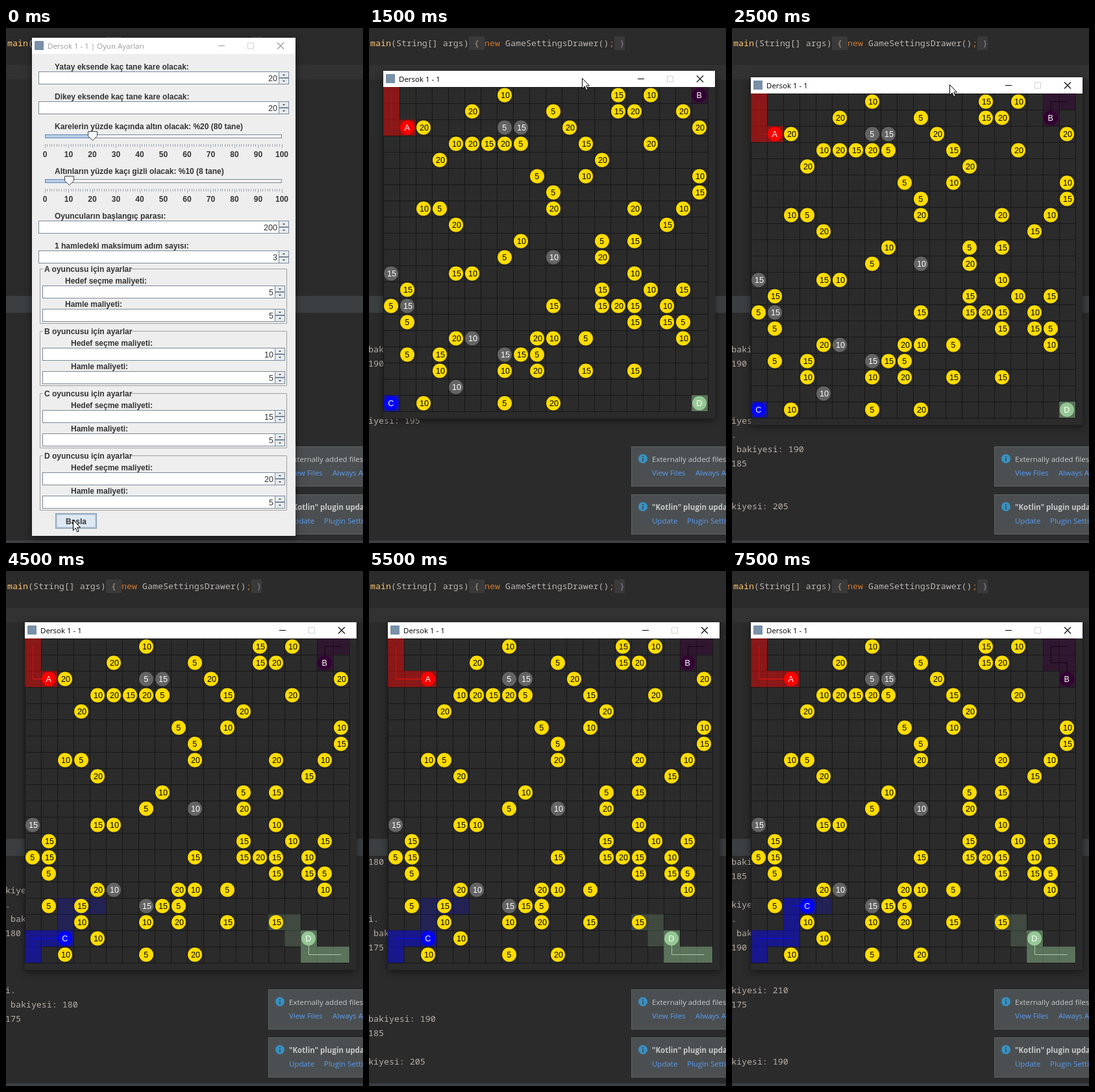
Animation of 550 by 794 pixels, one loop 8 s. Source, as an HTML page:

```html
<!DOCTYPE html>
<html lang="tr">
<head>
<meta charset="utf-8">
<style>
  html, body { margin: 0; width: 100%; height: 100%; overflow: hidden; background: #2b2b2b; }
  svg { display: block; }
  text { white-space: pre; }
  .mono { font: 13.3px "Noto Sans Mono", monospace; }
  .ui { font: 11.5px "Open Sans", sans-serif; }
  .swing { font: bold 12px "Liberation Sans", sans-serif; fill: #333; }
  .num { font: 12.6px "Liberation Sans", sans-serif; }
  .shadow { filter: drop-shadow(0 3px 6px rgba(0, 0, 0, .5)); }
</style>
</head>
<body>
<svg id="stage" width="550" height="794" viewBox="0 0 550 794"></svg>
<script>
const LOOP = 8000, CELL = 25;
const APP = "Dersok 1 - 1";

// Digits are open gold, letters are hidden gold (worth 5, 10, 15 or 20).
const BOARD = [
  ".......2......3.2...",
  ".....4....1...34..4.",
  ".14....ac..4.......4",
  "....24341...3...4...",
  "...4.........4......",
  ".........1..2......2",
  "..........1........3",
  "..21......4....4..2.",
  "....4............3..",
  "........2....1.3....",
  ".......1..b..4......",
  "c...32.........2....",
  ".3...........3..2.3.",
  "1c........3..343.2..",
  ".1.............3.31.",
  "....4b...42.1.....2.",
  ".1.3...c31..........",
  "...2...2.4..3..3....",
  "....b...............",
  "..2....1..4........."
];
const REVEALED = { "1,13": 4, "4,18": 4 };

// turns: [step, moves]; plan: cells still ahead of the last stop
const PLAYERS = [
  { name: "A", x: 0, y: 0, color: "#ff0000", line: "#ff1010", turns: [[2, "ddr"], [6, "r"]] },
  { name: "B", x: 19, y: 0, color: "#330033", line: "#150015", turns: [[3, "ld"], [7, "rd"]] },
  { name: "C", x: 0, y: 19, color: "#0000ff", line: "#0808ff", turns: [[4, "urr"], [8, "uur"]], plan: "uurr", planAt: 4 },
  { name: "D", x: 19, y: 19, color: "#96c896", line: "#a8d4a8", turns: [[5, "llu"]], plan: "llulul", planAt: 5 }
];
const DIRS = { u: [0, -1], d: [0, 1], l: [-1, 0], r: [1, 0] };

// Console lines: [baseline in the log, text, step it appears]
const LOG = [
  [500, "bakiyesi: 195", 2], [522, "190", 2], [610, "iyesi: 195", 2],
  [632, ".", 3], [654, " bakiyesi: 190", 3], [676, "185", 3], [742, "kiyesi: 205", 3],
  [764, ".", 4], [786, " bakiyesi: 185", 4], [808, "180", 4],
  [896, "i.", 5], [918, " bakiyesi: 180", 5], [940, "175", 5],
  [1050, "bakiyesi: 190", 6], [1072, "185", 6], [1116, "kiyesi: 205", 6],
  [1138, ".", 7], [1160, " bakiyesi: 195", 7], [1182, "190", 7], [1248, "kiyesi: 210", 7],
  [1270, "175", 8], [1358, "kiyesi: 190", 8]
];
const SCROLL = [0, 0, 0, 0, 113, 245, 355, 487, 597];

const rect = (x, y, w, h, fill, more = "") =>
  `<rect x="${x}" y="${y}" width="${w}" height="${h}" fill="${fill}" ${more}/>`;
const frame = (x, y, w, h, fill, stroke) =>
  rect(x + .5, y + .5, w - 1, h - 1, fill, `stroke="${stroke}"`);
const path = (d, stroke, more = "") =>
  `<path d="${d}" fill="none" stroke="${stroke}" ${more}/>`;
const text = (x, y, str, cls, fill = "", anchor = "start") =>
  `<text x="${x}" y="${y}" class="${cls}" text-anchor="${anchor}" ${fill && `fill="${fill}"`}>${str}</text>`;

function cursor(x, y) {
  return `<path transform="translate(${x} ${y})" d="M.5 .5V16.5L4.2 13L6.8 18.8L9.2 17.8L6.7 12H11.5Z" fill="#fff" stroke="#000"/>`;
}

function editor() {
  return rect(0, 0, 550, 794, "#2b2b2b") + rect(0, 57, 550, 22, "#323232") +
    rect(0, 413, 550, 26, "#3c3f41") + rect(0, 790, 550, 4, "#3c3f41") +
    rect(154, 13, 24, 21, "#3a3a3a") + rect(378, 13, 16, 21, "#3a3a3a") +
    text(2, 28, "main", "mono", "#ffc66d") +
    text(34, 28, "(String[] args)", "mono", "#b9b4b0") +
    text(162, 28, "{", "mono", "#b09a84") +
    text(178, 28, "new", "mono", "#cc7832") +
    text(210, 28, "GameSettingsDrawer()", "mono", "#b9b4b0") +
    text(370, 28, ";", "mono", "#cc7832") + text(386, 28, "}", "mono", "#8f7a95");
}

function consoleLines(step) {
  return LOG.filter(([y, , at]) => at <= step && y - SCROLL[step] > 445)
    .map(([y, str]) => text(-1, y - SCROLL[step], str, "mono", "#bbb0a6")).join("");
}

function popup(y, title, weight, link, other, otherX) {
  return frame(404, y, 160, 62, "#4b4f51", "#5c6062") +
    `<circle cx="422" cy="${y + 19}" r="7" fill="#3592c4"/>` +
    rect(421, y + 15, 2, 2, "#4b4f51") + rect(421, y + 18, 2, 5, "#4b4f51") +
    `<g font-weight="${weight}" style="font-weight:${weight}">` +
    `<text x="436" y="${y + 24}" class="ui" fill="#c8c8c8" style="font-weight:${weight}">${title}</text></g>` +
    text(436, y + 45, link, "ui", "#589df6") + text(otherX, y + 45, other, "ui", "#589df6");
}

function titleBar(x, y, w, title, ink) {
  const r = x + w, m = y + 12.5;
  return rect(x, y, w, 25, "#fff") + rect(x + 4, y + 5, 14, 14, "#7890a8") +
    text(x + 24, y + 16.5, title, "ui", ink) +
    path(`M${r - 119} ${m}h10`, ink) +
    path(`M${r - 73.5} ${m - 4.5}h9v9h-9z`, "#d0d0d0") +
    path(`M${r - 28} ${m - 5}l10 10m0 -10l-10 10`, ink, 'stroke-width="1.1"');
}

function spinner(x, y, w, value) {
  const b = x + w - 16;
  let s = frame(x, y, w, 20, "#fff", "#7a8a99") + text(b - 2, y + 15, value, "num", "#333", "end");
  for (const [dy, tip] of [[0, -2], [10, 2]]) {
    const c = y + dy + 5;
    s += frame(b, y + dy, 16, 10, "#e6ebf0", "#7a8a99") +
      `<path d="M${b + 6} ${c - tip / 2}h4l-2 ${tip}z" fill="#333"/>`;
  }
  return s;
}

function slider(y, label, value) {
  const at = v => 60 + v * 3.65, t = Math.round(at(value));
  let ticks = "", s = text(75, y + 4, label, "swing");
  for (let i = 0; i <= 100; i++) ticks += `M${Math.floor(at(i)) + .5} ${y + 27}v${i % 10 ? 4 : 6}`;
  s += frame(60, y + 12, 365, 6, "#f4f4f4", "#7a8a99") +
    frame(60, y + 12, t - 60, 6, "#b8cfe5", "#6382bf") + path(ticks, "#98a5b2");
  s += `<path d="M${t - 6.5} ${y + 7.5}h14v7l-7 7l-7 -7z" fill="#f4f7fa" stroke="#444"/>`;
  for (let i = 0; i <= 100; i += 10) s += text(at(i), y + 47, i, "swing", "", "middle");
  return s;
}

function group(i, cost) {
  const y = 372 + i * 96, lx = i ? 100 : 91;
  return path(`M57 ${y - .5}H52.5V${y + 83.5}H432.5V${y - .5}H193`, "#a0a0a0") +
    text(59, y + 4, "ABCD"[i] + " oyuncusu için ayarlar", "swing") +
    text(lx, y + 22, "Hedef seçme maliyeti:", "swing") + spinner(56, y + 25, 374, cost) +
    text(lx, y + 58, "Hamle maliyeti:", "swing") + spinner(56, y + 61, 374, 5);
}

function settings() {
  let s = rect(40, 15, 406, 768, "#eee", 'class="shadow"') +
    titleBar(40, 15, 406, APP + " | Oyun Ayarları", "#999");
  const fields = [
    [64, "Yatay eksende kaç tane kare olacak:", 20],
    [110, "Dikey eksende kaç tane kare olacak:", 20],
    [294, "Oyuncuların başlangıç parası:", 200],
    [340, "1 hamledeki maksimum adım sayısı:", 3]
  ];
  for (const [y, label, v] of fields) s += text(75, y, label, "swing") + spinner(50, y + 3, 386, v);
  s += slider(152, "Karelerin yüzde kaçında altın olacak: %20 (80 tane)", 20) +
    slider(221, "Altınların yüzde kaçı gizli olacak: %10 (8 tane)", 10);
  [5, 10, 15, 20].forEach((cost, i) => s += group(i, cost));
  return s + frame(76, 748, 64, 24, "#dde8f3", "#7a8a99") +
    rect(77.5, 749.5, 61, 21, "none", 'stroke="#a3b8cc" stroke-width="2"') +
    text(108, 765, "Başla", "swing", "", "middle") + cursor(103, 758);
}

function walk(x, y, moves) {
  const cells = [[x, y]];
  for (const m of moves) cells.push([x += DIRS[m][0], y += DIRS[m][1]]);
  return cells;
}

const disc = (x, y, fill, ink, str) =>
  `<circle cx="${x * CELL + 12}" cy="${y * CELL + 12.5}" r="11" fill="${fill}"/>` +
  text(x * CELL + (str > 9 ? 13 : 11.7), y * CELL + 17, str, "num", ink, "middle");

function board(step) {
  let grid = "", cells = "", lines = "", discs = "", heads = "";
  for (let i = 0; i <= 20; i++) grid += `M${i * CELL + .5} 0V500M0 ${i * CELL + .5}H500`;
  const visited = new Set();
  for (const p of PLAYERS) {
    const moves = p.turns.filter(([at]) => at <= step).map(([, m]) => m).join("");
    const trail = walk(p.x, p.y, moves), seen = new Set(trail.map(String));
    const [hx, hy] = trail[trail.length - 1];
    const plan = p.plan && step >= p.planAt
      ? walk(p.x, p.y, p.name === "C" ? "urr" + p.plan : p.plan) : [];
    const fill = (c, a) => rect(c[0] * CELL, c[1] * CELL, CELL, CELL, p.color, `opacity="${a}"`);
    for (const c of plan) if (!seen.has(String(c))) cells += fill(c, .2);
    trail.forEach((c, i) => {
      cells += fill(c, .45);
      visited.add(String(c));
      if (!i) return;
      const [px, py] = trail[i - 1];
      const alpha = p.name === "B" ? 1 : step < 4 ? .25 : px === c[0] && p.name !== "D" ? .5 : .95;
      lines += path(`M${px * CELL + 12.5} ${py * CELL + 12.5}L${c[0] * CELL + 12.5} ${c[1] * CELL + 12.5}`,
        p.line, `opacity="${alpha}"`);
    });
    heads += disc(hx, hy, p.color, "#fff", p.name);
  }
  BOARD.forEach((row, y) => [...row].forEach((ch, x) => {
    const key = x + "," + y;
    if (ch === "." || visited.has(key)) return;
    const hidden = ch >= "a" && !(step >= REVEALED[key]);
    const value = 5 * (ch >= "a" ? "abcd".indexOf(ch) + 1 : +ch);
    discs += disc(x, y, hidden ? "#646464" : "#ffdc00", hidden ? "#fff" : "#000", value);
  }));
  return path(grid, "#171717") + cells + lines + discs + heads;
}

function game(step) {
  const [x, y] = step < 3 ? [22, 66] : step < 4 ? [29, 76] : [29, 79];
  const pointer = { 1: [336, 215], 2: [328, 77], 3: [335, 87] }[step];
  return rect(x, y, 511, 536, "#2b2b2b", 'class="shadow"') + titleBar(x, y, 511, APP, "#000") +
    `<g transform="translate(${x} ${y + 25})">${board(step)}</g>` +
    (pointer ? cursor(...pointer) : "");
}

function scene(step) {
  return editor() + consoleLines(step) +
    popup(645, "Externally added files", 400, "View Files", "Always Add", 503) +
    popup(719, '"Kotlin" plugin update', 700, "Update", "Plugin Settings", 490) +
    (step ? game(step) : settings());
}

const stage = document.getElementById("stage");
const start = performance.now();
let shown = -1;

function tick() {
  const t = (performance.now() - start) % LOOP;
  const step = Math.floor((t + 500) / 1000);
  if (step !== shown) stage.innerHTML = scene(shown = step);
  requestAnimationFrame(tick);
}
tick();
</script>
</body>
</html>
```
